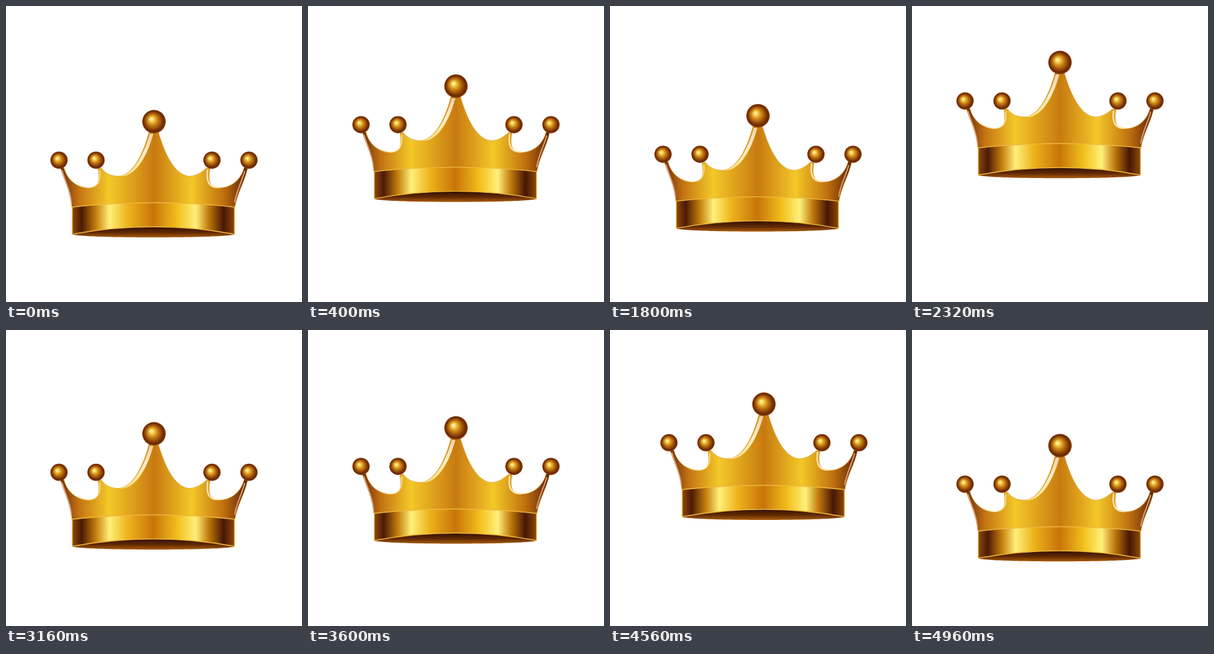
Recreate the animation shown at these times as an HTML page. Size 480 px wide and 480 px high, loop 5000 ms.

```html
<!DOCTYPE html>
<html lang="en">
<head>
<meta charset="utf-8">
<title>Crown</title>
<style>
  html, body { margin: 0; width: 100%; height: 100%; overflow: hidden; background: #fff; }
  svg { display: block; width: 100%; height: 100%; }
</style>
</head>
<body>
<svg viewBox="0 0 480 480">
  <defs>
    <radialGradient id="gold" cx=".5" cy=".5" r=".5" fx=".38" fy=".38">
      <stop offset="0" stop-color="#fffbd0"/>
      <stop offset=".16" stop-color="#fbd860"/>
      <stop offset=".42" stop-color="#d08a14"/>
      <stop offset=".7" stop-color="#92480a"/>
      <stop offset=".88" stop-color="#682604"/>
      <stop offset="1" stop-color="#8a4208"/>
    </radialGradient>
    <linearGradient id="metal" gradientUnits="userSpaceOnUse" x1="88" y1="0" x2="392" y2="0">
      <stop offset="0" stop-color="#6e2c0a"/>
      <stop offset=".1" stop-color="#c47412"/>
      <stop offset=".26" stop-color="#f4c828"/>
      <stop offset=".5" stop-color="#c87a10"/>
      <stop offset=".7" stop-color="#f4c828"/>
      <stop offset=".87" stop-color="#c0700e"/>
      <stop offset="1" stop-color="#5c2006"/>
    </linearGradient>
    <linearGradient id="band" gradientUnits="userSpaceOnUse" x1="107" y1="0" x2="371" y2="0">
      <stop offset="0" stop-color="#8e4a08"/>
      <stop offset=".06" stop-color="#4c1a04"/>
      <stop offset=".15" stop-color="#c8820e"/>
      <stop offset=".23" stop-color="#fff07a"/>
      <stop offset=".34" stop-color="#eeb41c"/>
      <stop offset=".5" stop-color="#c87408"/>
      <stop offset=".65" stop-color="#f2c01c"/>
      <stop offset=".76" stop-color="#fff07a"/>
      <stop offset=".84" stop-color="#c07a0c"/>
      <stop offset=".93" stop-color="#481604"/>
      <stop offset="1" stop-color="#8e4a08"/>
    </linearGradient>
    <linearGradient id="inside" gradientUnits="userSpaceOnUse" x1="0" y1="358" x2="0" y2="376">
      <stop offset="0" stop-color="#341002"/>
      <stop offset=".5" stop-color="#5e2804"/>
      <stop offset="1" stop-color="#b0600a"/>
    </linearGradient>
    <linearGradient id="gloss" gradientUnits="userSpaceOnUse" x1="0" y1="205" x2="0" y2="278">
      <stop offset="0" stop-color="#f0d0a0"/>
      <stop offset=".5" stop-color="#fff0c8"/>
      <stop offset="1" stop-color="#ffe080"/>
    </linearGradient>
  </defs>
  <g id="crown">
    <path fill="url(#metal)" stroke="#dca032" stroke-width=".8" d="M88 262H94C99 282 115 295 135 295C150 295 153 281 149 263H155C160 270 168 276 183 276C207 274 224 236 232 204H247C255 232 271 274 297 276C309 276 318 269 325 263H331C327 282 330 295 345 295C365 295 381 282 386 262H392C387 286 376 300 371 327Q240 312 107 327C105 300 95 285 88 262Z"/>
    <path fill="url(#gloss)" d="M233 207H239C230 240 211 279 184 276C207 274 225 238 233 207Z"/>
    <g fill="none" stroke="#ffe6b0" stroke-width="1.5" stroke-linecap="round">
      <path d="M117 290C137 299 155 295 152 267"/>
      <path stroke-width="2.5" d="M327 266C324 285 330 295 345 294"/>
      <path stroke="#d8a080" stroke-width="2" d="M91 267C96 285 104 298 106 318M387 268C381 289 374 299 371 318"/>
    </g>
    <path fill="url(#inside)" d="M107 370Q240 346 371 370C362 377 116 377 107 370Z"/>
    <path fill="url(#band)" stroke="#f0b83c" stroke-width="1.4" d="M107.500 326Q240 312 370.500 326V370Q240 346 107.500 370Z"/>
    <g id="balls" fill="url(#gold)"></g>
  </g>
</svg>
<script>
  const LOOP = 5000, SAMPLE = 40, TICK = 60;
  const STEP = 9.6;                             // pixels per tick
  const rides = [1, 17, 29, 45, 57, 73];        // up and down in turn, 10 ticks each
  const sways = [13, 24, 32, 49, 57, 65, 73, 77]; // left and right in turn, 2 ticks out and back
  const crown = document.getElementById('crown');

  function addBall(cx, cy, r) {
    const ball = document.createElementNS('http://www.w3.org/2000/svg', 'circle');
    Object.entries({ cx, cy, r }).forEach(([name, value]) => ball.setAttribute(name, value));
    document.getElementById('balls').append(ball);
  }
  addBall(240, 187.5, 19);
  for (const side of [-1, 1]) {
    for (const reach of [94, 154]) addBall(240 + side * reach, 250, 14);
  }

  const clamp = (v, max) => Math.min(max, Math.max(0, v));
  const turn = i => i % 2 ? 1 : -1;

  function pose(tick) {
    const x = sways.reduce((sum, at, i) => sum + turn(i) * clamp(2 - Math.abs(tick - at), 2), 0);
    const y = rides.reduce((sum, at, i) => sum + turn(i) * clamp(tick - at, 10), 0);
    return [x * STEP, y * STEP];
  }

  function draw(ms) {
    const time = Math.floor((ms % LOOP) / SAMPLE) * SAMPLE;
    const [x, y] = pose(Math.floor((time + SAMPLE / 2) / TICK));
    crown.setAttribute('transform', `translate(${x} ${y})`);
  }

  const start = performance.now();
  function loop() {
    draw(performance.now() - start);
    requestAnimationFrame(loop);
  }
  loop();
</script>
</body>
</html>
```
